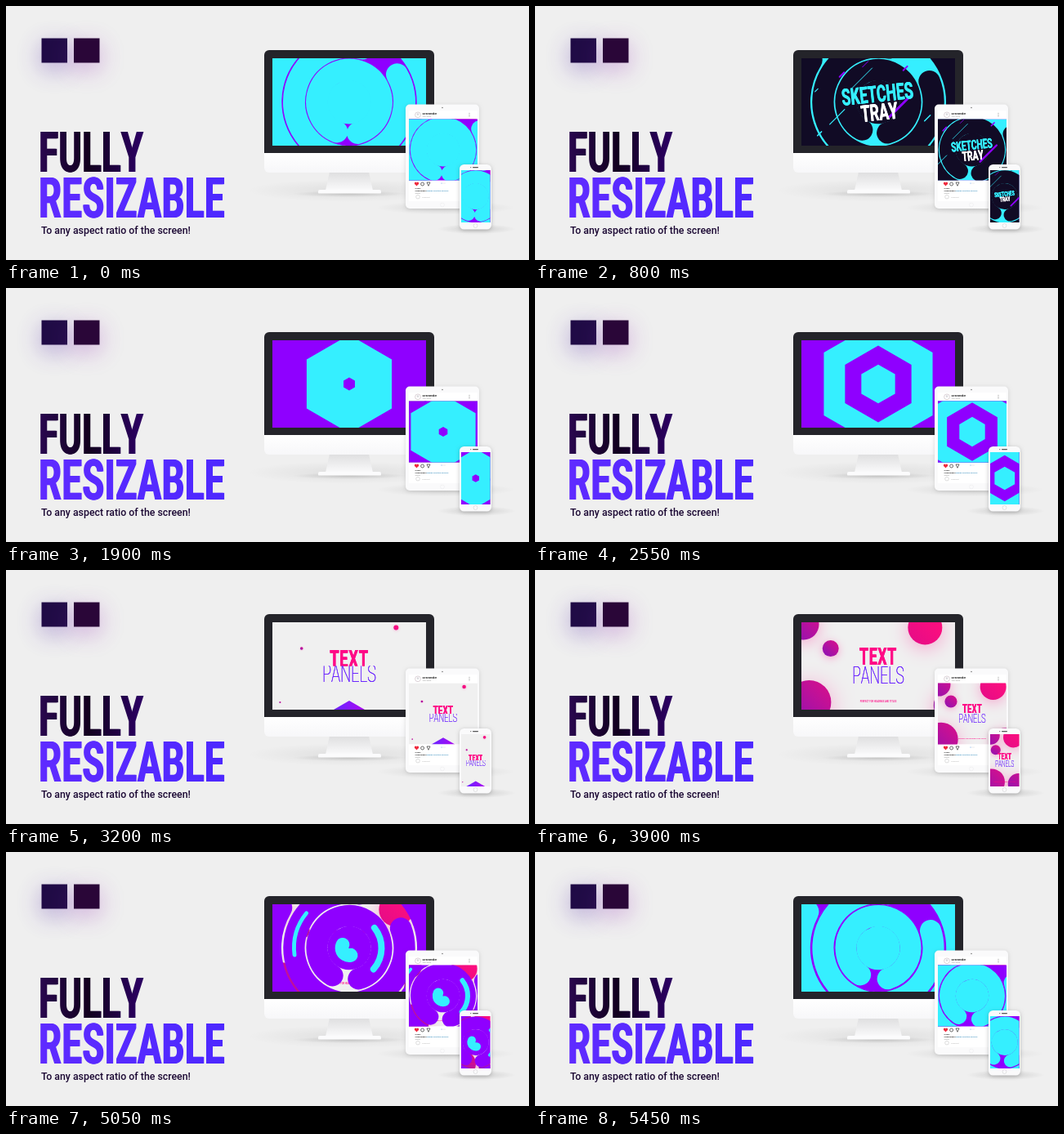
An HTML page with a canvas for the animation above (5500 ms loop, 640 by 311 pixels).

```html
<!DOCTYPE html>
<html lang="en">
<head>
<meta charset="utf-8">
<title>Fully resizable</title>
<style>
  html, body { margin: 0; width: 100%; height: 100%; overflow: hidden; background: #efefef; }
  canvas { display: block; width: 640px; height: 311px; }
</style>
</head>
<body>
<canvas id="stage"></canvas>
<script>
const LOOP = 5500, STEP = 50;
const PURPLE = '#8f00ff', CYAN = '#35efff', DARK = '#110b25', LIGHT = '#f0f0f0', PINK = '#ff0a86';
const canvas = document.getElementById('stage');
const ctx = canvas.getContext('2d');
const dpr = window.devicePixelRatio || 1;
canvas.width = 640 * dpr;
canvas.height = 311 * dpr;

const clamp = v => Math.min(1, Math.max(0, v));
const mix = (a, b, p) => a + (b - a) * p;
const easeOut = (p, power = 3) => 1 - (1 - clamp(p)) ** power;
const rad = deg => deg * Math.PI / 180;

// Screens: box, scale of the shapes, scale of each title
const monitor = { x: 326, y: 64, w: 188, h: 107, s: 1, sketch: 1, slide: 1 };
const tablet = { x: 493, y: 138.5, w: 84, h: 75, s: .76, sketch: .577, slide: .52 };
const phone = { x: 557, y: 201, w: 35.5, h: 64, s: .6, sketch: .28, slide: .36 };

function scoped(draw) { ctx.save(); draw(); ctx.restore(); }

function box(x, y, w, h, r, fill) {
  ctx.beginPath();
  ctx.roundRect(x, y, w, h, r);
  ctx.fillStyle = fill;
  ctx.fill();
}

function disc(x, y, r, fill) {
  ctx.beginPath();
  ctx.arc(x, y, r, 0, 7);
  ctx.fillStyle = fill;
  ctx.fill();
}

function ramp(x0, y0, x1, y1, ...colors) {
  const g = ctx.createLinearGradient(x0, y0, x1, y1);
  colors.forEach((c, i) => g.addColorStop(i / (colors.length - 1), c));
  return g;
}

function glow(color, blur, dy = 0) {
  ctx.shadowColor = color;
  ctx.shadowBlur = blur * dpr;
  ctx.shadowOffsetY = dy * dpr;
}

function label(text, x, y, size, color, weight = 400) {
  ctx.font = `${weight} ${size}px Roboto, sans-serif`;
  ctx.fillStyle = color;
  ctx.fillText(text, x, y);
}

// Condensed display face: narrow letters with heavier stems
function display(text, x, y, size, color, { weight = 700, stem = .03, spacing = 0, align = 'left' } = {}) {
  scoped(() => {
    ctx.translate(x, y);
    ctx.scale(.62, 1);
    ctx.textAlign = align;
    ctx.letterSpacing = spacing + 'px';
    ctx.fontKerning = 'none';
    const grow = size * stem, start = align === 'center' ? -grow / 2 : 0;
    for (let i = 0; i <= 2; i++) {
      label(text, start + grow * i / 2, 0, size, color, weight);
      if (!grow) break;
    }
  });
}

function fillScreen(scr, color) {
  ctx.fillStyle = color;
  ctx.fillRect(-scr.w / 2, -scr.h / 2, scr.w, scr.h);
}

// radius, width, delay, first and last middle angle
const bands = [
  [9, 37, .01, 195, 50],
  [39.5, 28, .07, 30, -100],
  [67.5, 29, .105, 208, 115],
  [97.5, 32, .12, -70, 90]
];

function sweep(scr, color, age) {
  if (age <= 0) return;
  if (age > 1120) return fillScreen(scr, color);
  scoped(() => {
    ctx.scale(scr.s, scr.s);
    ctx.strokeStyle = color;
    ctx.lineCap = 'round';
    for (const [r, w, delay, from, to] of bands) {
      const p = clamp(age / 1000 - delay);
      if (!p) continue;
      const e = easeOut(p), mid = rad(mix(from, to, e));
      ctx.lineWidth = w * easeOut(p, 4);
      ctx.beginPath();
      ctx.arc(0, 0, r, mid - Math.PI * e, mid + Math.PI * e);
      ctx.stroke();
    }
  });
}

const hexagons = [
  [1450, PURPLE], [1622, CYAN], [1821, PURPLE], [2226, CYAN],
  [2312, PURPLE], [2394, CYAN], [2550, LIGHT]
];

function hexagon(scr, color, age) {
  if (age <= 0) return;
  const r = 130 * (age / 450) ** 1.6 * scr.s;
  ctx.beginPath();
  for (let i = 0; i < 6; i++) ctx.lineTo(r * Math.sin(i * Math.PI / 3), -r * Math.cos(i * Math.PI / 3));
  ctx.fillStyle = color;
  ctx.fill();
}

// x, y, length, width, colour
const dashes = [
  [-32, -17, 34, 1, CYAN], [12, 20, 38, 3, PURPLE], [-60, 28, 26, 1.2, CYAN], [-48, -30, 8, 2, PURPLE],
  [-78, -12, 5, 1.2, CYAN], [30, -38, 7, 2, PURPLE], [56, 24, 10, 1.5, CYAN], [-20, -42, 10, 1, PURPLE],
  [70, 40, 8, 2, PURPLE], [-75, 42, 7, 1.5, CYAN]
];

function wipe(p, draw) {
  if (p <= 0) return;
  scoped(() => {
    const edge = mix(-60, 60, p);
    ctx.beginPath();
    ctx.moveTo(-70, -40);
    ctx.lineTo(edge + 12, -40);
    ctx.lineTo(edge - 12, 40);
    ctx.lineTo(-70, 40);
    ctx.clip();
    draw();
  });
}

function sketchScene(scr, age) {
  if (age <= 150) return;
  scoped(() => {
    ctx.scale(scr.s, scr.s);
    ctx.lineCap = 'round';
    const shift = (age - 450) * .014, grow = easeOut((age - 150) / 350);
    for (const [x, y, len, w, color] of dashes) {
      ctx.strokeStyle = color;
      ctx.lineWidth = w;
      ctx.beginPath();
      ctx.moveTo(x + shift, y - shift);
      ctx.lineTo(x + shift + len * .7 * grow, y - shift - len * .7 * grow);
      ctx.stroke();
    }
  });
  scoped(() => {
    ctx.scale(scr.sketch, scr.sketch);
    ctx.rotate(rad(-6));
    wipe((age - 130) / 280, () => display('SKETCHES', 0, 0, 28.5, CYAN, { align: 'center' }));
    wipe((age - 170) / 430, () => display('TRAY', 0, 22.5, 28.5, '#fff', { align: 'center' }));
  });
}

const HOT = ['#ff0f7d', '#e80c86'], COOL = ['#d0108f', '#9412b0'];

// position in half screens, radius, start, tones
const balls = [
  [.61, -.88, 21, 3160, HOT], [-.62, -.4, 10, 3150, COOL], [-.9, .83, 27, 3190, COOL],
  [-.97, -.95, 19, 3300, COOL], [.95, .9, 22, 3330, COOL]
];

function ball(x, y, r, tones) {
  scoped(() => {
    glow('rgba(255,20,140,.35)', r * 1.1, r * .2);
    disc(x, y, r, ramp(x + r * .7, y - r * .7, x - r * .7, y + r * .7, ...tones));
  });
}

function half(top, draw) {
  scoped(() => {
    ctx.beginPath();
    ctx.rect(-60, top ? -40 : 0, 120, 40);
    ctx.clip();
    draw();
  });
}

function slideScene(scr, t) {
  const { w, h, s } = scr;
  for (const [x, y, r, start, tones] of balls) {
    const e = easeOut((t - start) / 800);
    if (e) ball(x * w / 2, y * h / 2, r * s * e, tones);
  }
  const peak = 11 * s * clamp((3500 - t) / 300);
  if (peak) {
    ctx.beginPath();
    ctx.moveTo(-peak * 1.73, h / 2);
    ctx.lineTo(0, h / 2 - peak);
    ctx.lineTo(peak * 1.73, h / 2);
    ctx.fillStyle = ramp(-peak, 0, peak * 1.5, 0, '#7420ff', '#a80af0');
    ctx.fill();
  }
  scoped(() => {
    const k = scr.slide * (1.06 - .05 * (t - 3200) / 1000);
    const hidden = 21 * (1 - easeOut((t - 2960) / 500));
    ctx.scale(k, k);
    half(true, () => display('TEXT', 0, -1.5 + hidden, 28, PINK, { align: 'center', spacing: 1 }));
    half(false, () => display('PANELS', 0, 21 - hidden, 28, '#6b25ff', { weight: 100, stem: .012, align: 'center' }));
  });
  scoped(() => {
    ctx.globalAlpha = easeOut((t - 3500) / 300);
    ctx.translate(0, .83 * h / 2);
    ctx.scale(s, s);
    ctx.textAlign = 'center';
    label('PERFECT FOR HEADINGS AND TITLES', 0, 0, 2.6, PINK, 500);
  });
}

function playScreen(scr, t) {
  scoped(() => {
    ctx.beginPath();
    ctx.rect(scr.x, scr.y, scr.w, scr.h);
    ctx.clip();
    ctx.translate(scr.x + scr.w / 2, scr.y + scr.h / 2);
    if (t < 3000) {
      fillScreen(scr, DARK);
      sketchScene(scr, t - 300);
      for (const [start, color] of hexagons) hexagon(scr, color, t - start);
    } else {
      fillScreen(scr, LIGHT);
      if (t < 5700) slideScene(scr, t);
      sweep(scr, PURPLE, t - 4490);
      sweep(scr, CYAN, t - 4900);
      sweep(scr, DARK, t - 5735);
      sketchScene(scr, t - 5800);
    }
  });
}

function softShadow(x, y, rx, ry, alpha) {
  scoped(() => {
    ctx.translate(x, y);
    ctx.scale(1, ry / rx);
    const g = ctx.createRadialGradient(0, 0, 0, 0, 0, rx);
    g.addColorStop(0, `rgba(0,0,0,${alpha})`);
    g.addColorStop(1, 'rgba(0,0,0,0)');
    disc(0, 0, rx, g);
  });
}

function drawMonitor() {
  softShadow(420, 226, 125, 14, .07);
  softShadow(420, 230, 70, 4, .14);
  ctx.beginPath();
  ctx.moveTo(396, 203);
  ctx.lineTo(444, 203);
  ctx.lineTo(449, 226);
  ctx.lineTo(391, 226);
  ctx.fillStyle = ramp(0, 203, 0, 226, '#dededf', '#fafafb');
  ctx.fill();
  box(382, 225, 77, 4.5, [2, 2, 1, 1], '#fbfbfc');
  box(316, 180, 208, 24, [0, 0, 6, 6], ramp(0, 180, 0, 204, '#ffffff', '#f7f7f9'));
  box(316, 54, 208, 126, [6, 6, 0, 0], '#24242a');
}

function ring(x, y, r, color, width = .6) {
  ctx.beginPath();
  ctx.arc(x, y, r, 0, 7);
  ctx.strokeStyle = color;
  ctx.lineWidth = width;
  ctx.stroke();
}

function drawTablet() {
  softShadow(538, 247, 85, 8, .1);
  scoped(() => {
    glow('rgba(0,0,0,.14)', 5, 1);
    box(489, 120.5, 90, 127.5, 5, '#fafafb');
  });
  disc(534, 124.5, .8, '#777');
  box(493, 128, 84, 111, 0, '#fff');
  ring(504, 133.3, 3.4, '#c4b4bc');
  disc(504, 132.6, 1.3, '#d8d8dc');
  label('screenmaker', 509.5, 133, 3, '#222', 700);
  label('Your place', 509.5, 136, 2.3, '#888');
  for (let i = 0; i < 3; i++) disc(567, 131.3 + i * 1.9, .5, '#777');

  disc(501.3, 217, 1.5, '#f0283c');
  disc(503.7, 217, 1.5, '#f0283c');
  ctx.beginPath();
  ctx.moveTo(499.9, 217.6);
  ctx.lineTo(502.5, 220.6);
  ctx.lineTo(505.1, 217.6);
  ctx.fill();
  ring(509.6, 218, 2, '#333', .7);
  ctx.beginPath();
  ctx.moveTo(515, 216);
  ctx.lineTo(519, 216);
  ctx.lineTo(517, 220.3);
  ctx.closePath();
  ctx.stroke();
  for (let i = 0; i < 3; i++) disc(533 + i * 2, 217, .5, i ? '#ccc' : '#3f8fe0');
  label('8 likes', 500.5, 223.6, 2.4, '#333', 700);
  label('screenmaker', 500.5, 227.2, 2.4, '#222', 700);
  label('#resize #motion #screen', 514.5, 227.2, 2.4, '#2684b8', 500);
  label('#titles', 500.5, 230, 2.3, '#888');
  ring(504, 233.7, 2.3, '#bbb', .5);
  label('Comment', 509, 234.5, 2.2, '#aaa');
  ring(534, 243.5, 2.4, '#e8e8ea', .5);
}

function drawPhone() {
  softShadow(576, 273, 48, 6, .14);
  scoped(() => {
    glow('rgba(0,0,0,.22)', 5, 1);
    box(555, 194, 39, 79.5, 5.5, '#fafafb');
  });
  box(571, 197, 7, 1.2, .6, '#555');
  disc(568.8, 197.6, .6, '#555');
  ring(574.5, 269, 2.5, '#d2d2d6', .6);
}

function badge(x, color, halo) {
  scoped(() => {
    glow(halo, 30, 8);
    box(x, 39.5, 31.5, 30, 0, color);
  });
}

function drawCopy() {
  badge(43.5, '#1f0a45', 'rgba(90,50,170,.45)');
  badge(83, '#2a0638', 'rgba(150,50,180,.4)');
  display('FULLY', 39.5, 203, 69, ramp(0, 0, 200, 0, '#2a0850', '#12001f', '#2b0060'), { stem: .04, spacing: 1.1 });
  display('RESIZABLE', 39.5, 258.5, 69, ramp(0, 0, 365, 0, '#5f2bff', '#4d28ff'), { stem: .04, spacing: 1.5 });
  label('To any aspect ratio of the screen!', 43, 278.6, 12.34, '#1b0833', 500);
}

function render(ms) {
  let t = Math.floor(ms % LOOP / STEP) * STEP;
  if (t < 1400) t += LOOP;
  ctx.setTransform(dpr, 0, 0, dpr, 0, 0);
  ctx.fillStyle = '#efefef';
  ctx.fillRect(0, 0, 640, 311);
  drawCopy();
  drawMonitor();
  playScreen(monitor, t);
  drawTablet();
  playScreen(tablet, t);
  drawPhone();
  playScreen(phone, t);
}

const begin = performance.now();
function tick() {
  render(performance.now() - begin);
  requestAnimationFrame(tick);
}
tick();
</script>
</body>
</html>
```
